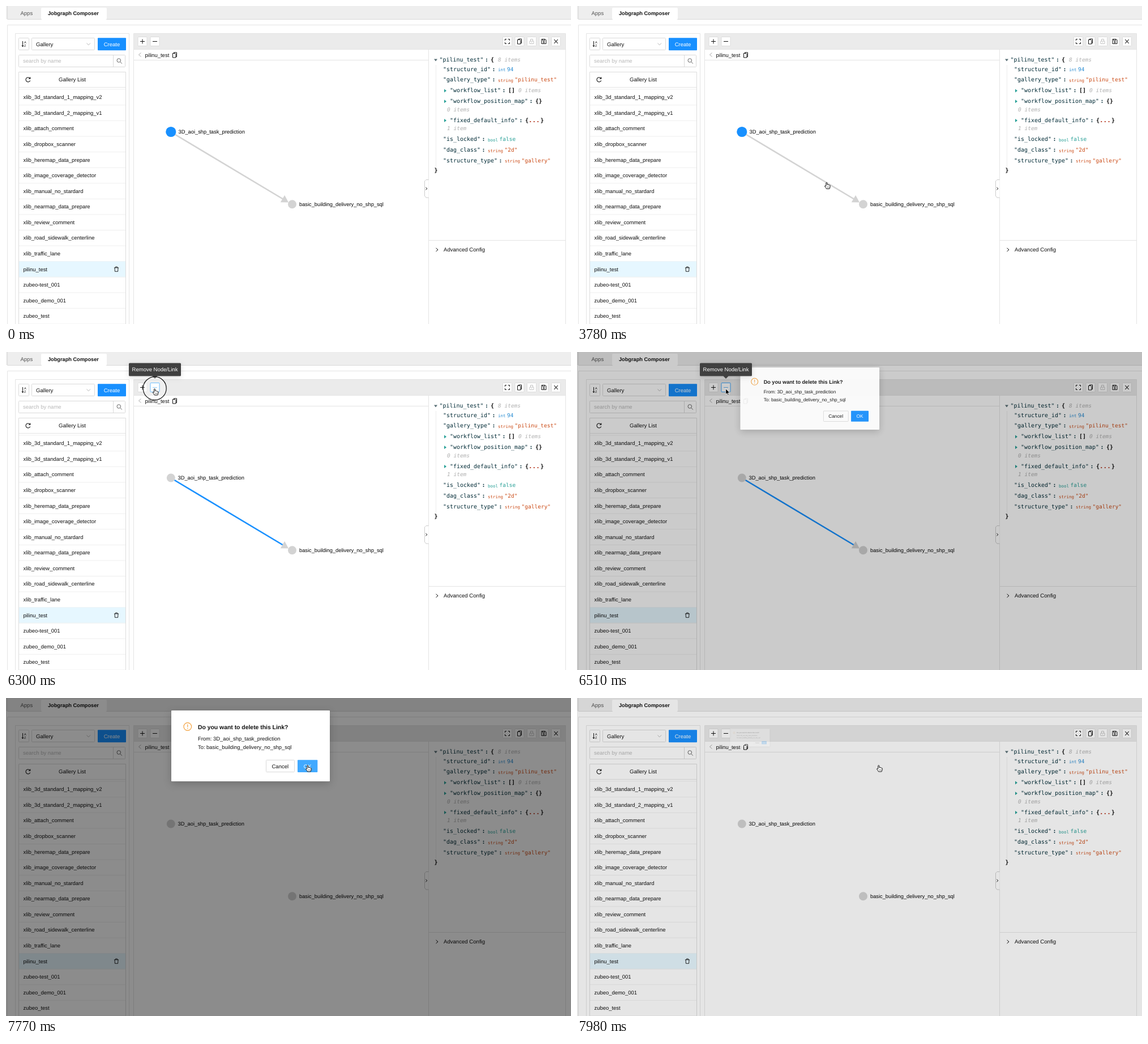
Animation, 998 px wide and 561 px high, one loop 8 s. Source, as an HTML page:

```html
<!DOCTYPE html>
<html lang="en">
<head>
<meta charset="utf-8">
<title>Graph editor</title>
<style>
  html, body { margin: 0; width: 100%; height: 100%; overflow: hidden; background: #fff; }
  svg { display: block; width: 998px; height: 561px; font-family: "Liberation Sans", Arial, sans-serif; }
  text { white-space: pre; text-rendering: geometricPrecision; }
  .mono { font-family: "DejaVu Sans Mono", monospace; }
  .soft { filter: drop-shadow(0 2px 5px rgba(0,0,0,.13)); }
  .deep { filter: drop-shadow(0 4px 7px rgba(0,0,0,.2)); }
</style>
</head>
<body>
<svg id="stage" viewBox="0 0 998 561" xmlns="http://www.w3.org/2000/svg"></svg>
<script>
const LOOP = 8000, STEP = 70;
const BLUE = '#1890ff', PALE = '#91cafa', GREY = '#d3d3d3', INK = '#111';
const PROJECT = 'pilinu_test';
const NODE_A = '3D_aoi_shp_task_prediction', NODE_B = 'basic_building_delivery_no_shp_sql';

// Static drawing helpers; text is placed by its vertical centre.
const text = (x, y, s, size = 9.5, extra = '') =>
  `<text x="${x}" y="${y + size * .345}" font-size="${size}" fill="${INK}" ${extra}>${s}</text>`;
const mono = (x, y, s, fill = '#002b36', size = 9.97, extra = '') =>
  `<text class="mono" x="${x}" y="${y + size * .3}" font-size="${size}" fill="${fill}" ${extra}>${s}</text>`;
const rect = (x, y, w, h, fill, stroke = 'none', rx = 0, extra = '') =>
  `<rect x="${x}" y="${y}" width="${w}" height="${h}" fill="${fill}" stroke="${stroke}" rx="${rx}" ${extra}/>`;
const path = (d, stroke = INK, width = 1, fill = 'none', extra = '') =>
  `<path d="${d}" stroke="${stroke}" stroke-width="${width}" fill="${fill}" ${extra}/>`;
const line = (d, stroke = '#e4e4e4') => path(d, stroke);
const group = (id, body, extra = '') => `<g id="${id}" ${extra}>${body}</g>`;
const at = (x, y, body) => `<g transform="translate(${x} ${y})">${body}</g>`;
const button = (x, stroke = '#dcdcdc') => rect(x - 8, 54.5, 16, 16, '#fff', stroke, 1);
const copyIcon = (x, y) => at(x, y, path('M-1.5-3V-4.5H3.5V3H2M-3.5-3H1L2-2V4.5H-3.5Z', INK, 1));

function topBar() {
  return rect(0, 0, 998, 23, '#eeeeee') + line('M2.5 0V23.5H998', '#d9d9d9') +
    rect(62, 3, 116, 21, '#fff', 'none', 2) +
    text(25.5, 12.5, 'Apps', 9.5, 'style="fill:#555"') +
    text(74, 12.5, 'Jobgraph Composer', 9.2, 'font-weight="bold"') +
    line('M2.5 561V33.5H998') + line('M16.5 561V48.5H217.5V561') + line('M225.5 561V48.5H988.5V561');
}

function sidebar() {
  const names = ['xlib_3d_standard_1_mapping_v2', 'xlib_3d_standard_2_mapping_v1', 'xlib_attach_comment',
    'xlib_dropbox_scanner', 'xlib_heremap_data_prepare', 'xlib_image_coverage_detector',
    'xlib_manual_no_stardard', 'xlib_nearmap_data_prepare', 'xlib_review_comment',
    'xlib_road_sidewalk_centerline', 'xlib_traffic_lane', PROJECT,
    'zubeo-test_001', 'zubeo_demo_001', 'zubeo_test'];
  const rows = names.map((name, i) => {
    const y = 161 + i * 27.58;
    return (name === PROJECT ? rect(23, y - 13.8, 188, 27.6, '#e6f7ff') : '') +
      line(`M23 ${y + 13.8}H211`, '#efefef') + text(30.5, y, name, 9.45);
  }).join('');
  const bin = path('M-4-2.5H4M-1.5-2.5V-4.2H1.5V-2.5M-3-2.5L-2.6 4H2.6L3-2.5', INK, .9);
  return rect(22.5, 56.5, 18, 21, '#fff', '#d9d9d9', 1) +
    path('M29.5 62V71.5M27.8 69.5L29.5 71.8L31.2 69.5') +
    text(32, 64.5, 'A', 5.5) + text(32, 70.5, 'Z', 5.5) +
    rect(45.5, 56.5, 111, 21, '#fff', '#d9d9d9', 1) + text(53, 67.5, 'Gallery', 9.6) +
    path('M142.5 65.5L145.7 69L149 65.5', '#bbb') +
    rect(162, 56.2, 50, 22, BLUE, 'none', 1) + text(187, 67.5, 'Create', 9.5, 'text-anchor="middle" style="fill:#fff"') +
    rect(22.5, 86.5, 188, 21, '#fff', '#d9d9d9', 1) + line('M189.5 86V108', '#d9d9d9') +
    text(30, 97, 'search by name', 9.5, 'style="fill:#b8b8b8"') +
    `<circle cx="199.3" cy="96" r="3.3" fill="none" stroke="#666"/>` + path('M201.7 98.5L204.8 101.7', '#666') +
    line('M22.5 561V116.5H211.5V561', '#dcdcdc') + line('M23 143.5H211') + line('M23 146.8H211', '#efefef') +
    path('M42.2 127.5A4 4 0 1 0 42.7 131.5M42.8 125.5V128.3H40', INK, 1.1) +
    text(117, 130, 'Gallery List', 9.6, 'text-anchor="middle"') +
    rows + at(195, 464.3, bin);
}

function toolbar() {
  return rect(226, 49, 762, 27, '#ebebeb') + line('M226 76.5H988') + line('M226 95.5H746') +
    [241, 263, 885.5, 907, 928.5, 950, 971.5].map(x => button(x)).join('') +
    path('M237 62.5H245M241 58.5V66.5') + path('M259 62.5H267') +
    at(885.5, 62.5, path('M-4-1.5V-4H-1.5M1.5-4H4V-1.5M4 1.5V4H1.5M-1.5 4H-4V1.5')) +
    copyIcon(907, 62.5) +
    at(928.5, 62.5, path('M-3.5-.5H3.5V4H-3.5ZM-2-.5V-4H2V-.5M0 1V2.5', '#c4c4c4')) +
    at(950, 62.5, path('M-4-4H2.5L4-2.5V4H-4ZM-2-4V-1.5H1.5V-4') + `<circle cy="1.4" r="1.2" fill="none" stroke="${INK}"/>`) +
    path('M968.3 59L974.7 66M974.7 59L968.3 66', INK, 1.1) +
    path('M238.5 82.5L234.5 86L238.5 89.5', '#aaa') +
    text(245.5, 86.5, PROJECT, 9.5) + copyIcon(298, 86.5);
}

function jsonPanel() {
  const RED = '#cb4b16', TEAL = '#2aa198', SKY = '#268bd2';
  const key = (x, y, s) => {
    const end = x + (s.length + 2) * 6;
    return mono(x, y, `"${s}"`) + mono(end + 2.5, y, ':', '#002b36', 9.97, 'font-weight="bold"');
  };
  const note = (x, y, s) => mono(x, y, s, '#b0b0b0', 9.5, 'font-style="italic"');
  const brace = (x, y, s) => mono(x, y, s, '#111', 9.97, 'font-weight="bold"');
  const field = (y, name, type, value, fill) => {
    const x = 772 + (name.length + 2) * 6 + 13;
    return key(772, y, name) + mono(x, y + .8, type, fill, 7.5) + mono(x + type.length * 4.52 + 2.5, y, value, fill, 9.5);
  };
  const arrow = y => path(`M774 ${y - 3}L778 ${y}L774 ${y + 3}Z`, 'none', 0, TEAL);
  return line('M746.5 76V561') + line('M747 413.5H988') + line('M759.5 104V284', '#ededed') +
    path('M756 93.5H762L759 97.5Z', 'none', 0, '#586e75') +
    key(765.5, 95, PROJECT) + brace(856, 95, '{') + note(869, 95, '8 items') +
    field(112, 'structure_id', 'int', '94', SKY) +
    field(130.5, 'gallery_type', 'string', `"${PROJECT}"`, RED) +
    arrow(149.5) + key(784, 149.5, 'workflow_list') + brace(887, 149.5, '[]') + note(905, 149.5, '0 items') +
    arrow(168.3) + key(784, 168.3, 'workflow_position_map') + brace(935, 168.3, '{}') + note(779, 183, '0 items') +
    arrow(202) + key(784, 202, 'fixed_default_info') + brace(917, 202, '{') +
    mono(923, 202, '...', '#b3321a', 11, 'font-weight="bold"') + brace(944, 202, '}') + note(779, 216.5, '1 item') +
    field(235.5, 'is_locked', 'bool', 'false', TEAL) +
    field(254.5, 'dag_class', 'string', '"2d"', RED) +
    field(273, 'structure_type', 'string', '"gallery"', RED) + brace(756.5, 290, '}') +
    path('M759.5 427L763 430L759.5 433', INK, 1) + text(773, 429.5, 'Advanced Config', 9.6) +
    path('M746.5 306.5H742L739.5 309V335L742 338H746.5', '#ccc', 1, '#fff') +
    path('M741.3 320L744 322.2L741.3 324.4', INK, .9);
}

function graph() {
  return group('link', path('M297.5 226L490 341', GREY, 2.6, 'none', 'id="edge"') +
      path('M499 346.6L484.8 346.3L492.2 333.8Z', 'none', 0, GREY, 'id="head"')) +
    '<circle id="dotA" cx="291.3" cy="222"/><circle id="dotB" cx="505.5" cy="349.8" r="7.5"/>' +
    `<text id="labelA">${NODE_A}</text><text id="labelB">${NODE_B}</text>`;
}

const modal = () => rect(292, 22, 280, 125, '#fff', 'none', 1, 'class="deep"') +
  '<circle cx="320.8" cy="50.5" r="6.8" fill="none" stroke="#f3a03c" stroke-width="1.2"/>' +
  path('M320.8 46.5V51.5M320.8 53V54.5', '#f3a03c', 1.2) +
  text(339, 51, 'Do you want to delete this Link?', 10.4, 'font-weight="bold"') +
  text(339, 71.3, 'From: ' + NODE_A, 9.4) + text(339, 86.3, 'To: ' + NODE_B, 9.4) +
  rect(459.5, 109.5, 50, 21, '#fff', '#d9d9d9', 1) + text(484.3, 120.3, 'Cancel', 9.5, 'text-anchor="middle"') +
  rect(515, 109.3, 35.3, 21.6, BLUE, 'none', 1, 'id="ok"') +
  text(532.7, 120.3, 'OK', 9.5, 'text-anchor="middle" style="fill:#fff"');

const tooltip = () => path('M218.5 19.5H307.5Q309 19.5 309 21V41Q309 42.5 307.5 42.5H267.5L263 47L258.5 42.5H218.5Q217 42.5 217 41V21Q217 19.5 218.5 19.5Z',
    'none', 0, '#404040', 'class="soft"') +
  text(263, 31, 'Remove Node/Link', 9.5, 'text-anchor="middle" style="fill:#fff"');

const arrowCursor = path('M0 0V10.2L2.3 8.1L3.9 11.6L5.6 10.8L4 7.4H7.2Z', '#fff', .8, '#000');
const handCursor = path('M-1.2 6V.8Q-.2-.8 .8 .8V4Q2.3 3 2.9 4.3Q4.3 3.7 4.8 5Q6.4 4.6 6.3 6.3Q6.3 9 5 11.3H-.4Q-1.6 9-3.5 6.8Q-3.4 5-1.2 6.6Z',
    '#111', 1, '#fff') + path('M1 7.3V9.5M2.7 7.3V9.5M4.3 7.3V9.5', '#333', .6);

const stage = document.getElementById('stage');
stage.innerHTML = topBar() + sidebar() + toolbar() +
  group('hot', button(263, '#40a9ff') + path('M259 62.5H267', '#69b8f5')) +
  jsonPanel() + graph() + rect(0, 0, 998, 561, '#000', 'none', 0, 'id="mask"') +
  group('modal', modal()) + group('tip', tooltip()) +
  '<circle id="ring" fill="#fff" fill-opacity=".25" stroke="#111" stroke-width="1.2"/>' +
  group('arrow', arrowCursor) + group('hand', handCursor);

const el = Object.fromEntries([...stage.querySelectorAll('[id]')].map(e => [e.id, e]));
const set = (e, attrs) => { for (const k in attrs) e.setAttribute(k, attrs[k]); };
const show = (e, on) => set(e, { visibility: on ? 'visible' : 'hidden' });

// Timeline: cursor moves [start, end, x, y], then spans of each state.
const MOVES = [[0, 0, 493, 590], [70, 70, 493, 553], [210, 210, 435, 336], [490, 630, 434, 313],
  [840, 1260, 435.5, 308.5], [1960, 1960, 433.5, 313.5], [2380, 2520, 437.5, 310.5],
  [3080, 3150, 437, 311], [3360, 3500, 438.5, 312], [3780, 3780, 441, 311.2], [3850, 3850, 442, 312],
  [4130, 4200, 443, 313], [4340, 4410, 445, 316], [4690, 4690, 447, 319], [5530, 5740, 296, 86],
  [5950, 6090, 262.7, 64.7], [6790, 7350, 533, 118.6]];
const HAND = [[1260, 1960], [2520, 3080], [3780, 5530], [5950, 6510], [7350, LOOP]];
const HOVER = [[1960, 2380], [3360, 3500], [4340, 5530]];
const CLICKS = [[1400, 1540, 15], [2520, 2660, 15], [4690, 4830, 15], [6230, 6300, 15], [6300, 6440, 20.5], [7560, 7700, 20.5]];
const PICKED = 4830, REMOVED = 7700;

const clamp = v => Math.min(1, Math.max(0, v));
const ramp = (t, start, dur) => clamp((t - start) / dur);
const during = (spans, t) => spans.find(s => t >= s[0] && t < s[1]);

function bezier(x1, y1, x2, y2) {
  const curve = (a, b, u) => 3 * a * u * (1 - u) ** 2 + 3 * b * u * u * (1 - u) + u ** 3;
  return p => {
    let lo = 0, hi = 1;
    for (let i = 0; i < 20; i++) {
      const mid = (lo + hi) / 2;
      if (curve(x1, x2, mid) < p) lo = mid; else hi = mid;
    }
    return p <= 0 ? 0 : curve(y1, y2, hi);
  };
}
const zoomIn = bezier(.08, .82, .17, 1), zoomOut = bezier(.78, .14, .15, .86);
const glide = bezier(.42, 0, .58, 1);

function cursorAt(t) {
  let [, , x, y] = MOVES[0];
  for (const [start, end, nx, ny] of MOVES) {
    if (t < start) break;
    const p = glide(ramp(t, start - STEP, end - start + STEP));
    x += (nx - x) * p;
    y += (ny - y) * p;
  }
  return [x, y];
}

function drawGraph(t) {
  const hover = !!during(HOVER, t), picked = t >= PICKED, size = hover ? 11.13 : 9.31;
  show(el.link, t < REMOVED);
  set(el.edge, { stroke: hover ? PALE : picked ? BLUE : GREY });
  set(el.head, { fill: hover ? PALE : GREY });
  set(el.dotA, { r: picked ? 7.5 : 9.1, fill: hover ? PALE : picked ? GREY : BLUE });
  set(el.dotB, { fill: hover ? PALE : GREY });
  const base = size * .345;
  set(el.labelA, { x: (picked ? 303.5 : 304.5) + (hover ? 2 : 0), y: 221.7 + base, 'font-size': size });
  set(el.labelB, { x: hover ? 520 : 518, y: 349.5 + base, 'font-size': size });
}

function drawDialog(t) {
  const open = zoomIn(ramp(t, 6458, 200)) * (1 - zoomOut(ramp(t, 7825, 200)));
  const scale = .2 + .8 * open;
  show(el.modal, open > 0);
  set(el.modal, { opacity: Math.sqrt(open), transform: `translate(263 65) scale(${scale}) translate(-263 -65)` });
  set(el.mask, { opacity: .45 * ramp(t, 6420, 200) * (1 - ramp(t, 7825, 200)) });
  set(el.ok, { fill: t >= 7280 ? '#40a9ff' : BLUE });
  set(el.tip, { opacity: ramp(t, 6050, 120) * (1 - ramp(t, 6930, 120)) });
  show(el.hot, t >= 5950 && t < 6930);
}

function drawCursor(t) {
  const [x, y] = cursorAt(t), hand = !!during(HAND, t), click = during(CLICKS, t);
  for (const e of [el.arrow, el.hand]) set(e, { transform: `translate(${x} ${y})` });
  show(el.hand, hand);
  show(el.arrow, !hand);
  show(el.ring, !!click);
  if (click) set(el.ring, { cx: x, cy: y - .5, r: click[2] });
}

const begin = performance.now();
function render() {
  const t = Math.floor(((performance.now() - begin) % LOOP) / STEP) * STEP;
  drawGraph(t);
  drawDialog(t);
  drawCursor(t);
  requestAnimationFrame(render);
}
render();
</script>
</body>
</html>
```
